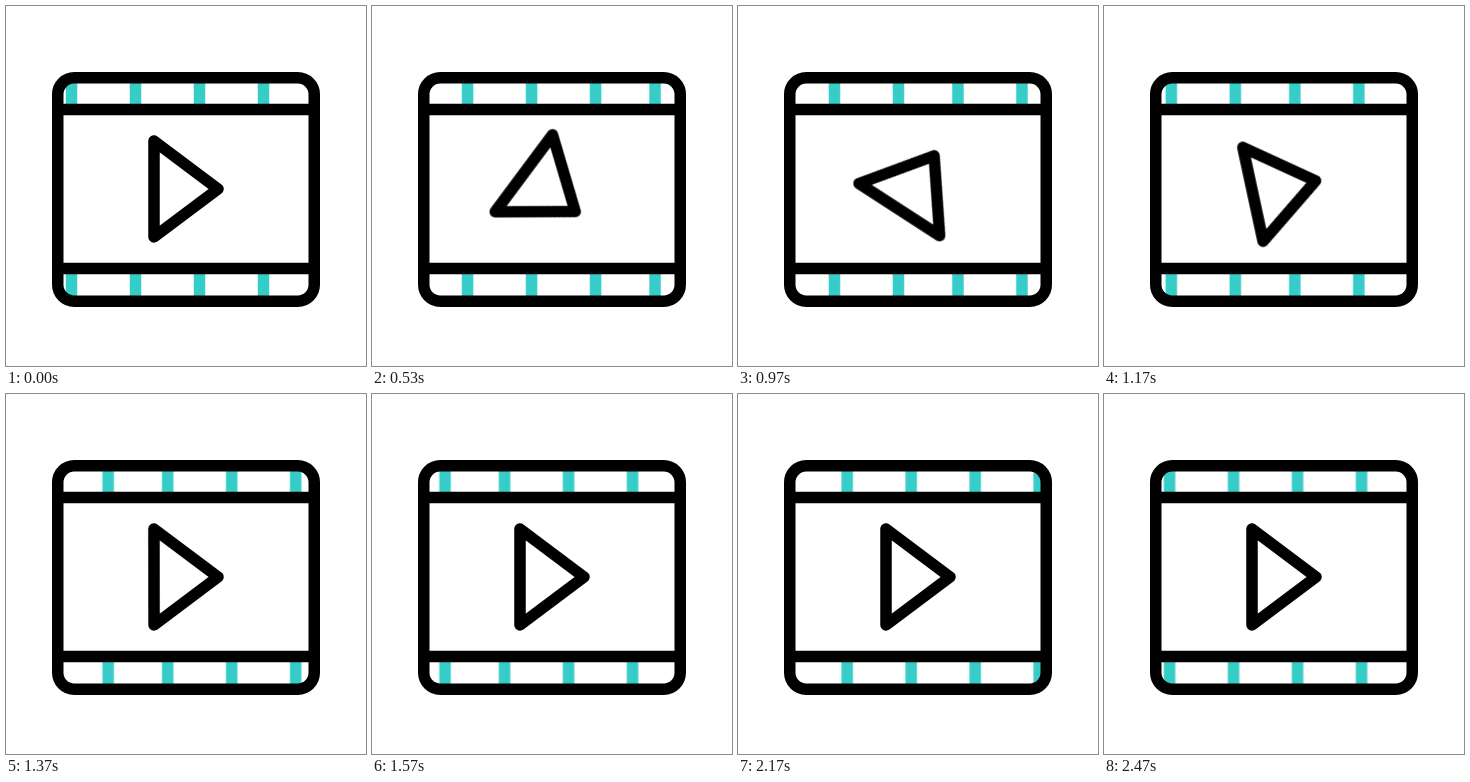
These frames come from a looping animation (360x360 px, 2500 ms). An HTML page:

```html
<!DOCTYPE html>
<html lang="en">
<head>
<meta charset="utf-8">
<title>Film strip player</title>
<style>
  html, body { margin: 0; width: 100%; height: 100%; overflow: hidden; background: #fff; }
  svg { display: block; width: 100vw; height: 100vh; }
  .ink { fill: none; stroke: #000; stroke-width: 11.5; stroke-linecap: round; stroke-linejoin: round; }
  #row { fill: none; stroke: #36cdc8; stroke-width: 25; stroke-dasharray: 11.5 52.5; }

  /* The clock script moves --delay in 30 fps ticks. */
  .strip, .play { animation: 2.5s linear var(--delay, 0s) infinite paused; }
  .strip { animation-name: slide; }
  .play { animation-name: spin; transform-origin: 173.6px 181px; }

  @keyframes slide {
    0%, 12% { transform: translateX(0); }
    98.6667%, 100% { transform: translateX(-315.5px); }
  }
  @keyframes spin {
    0% { transform: rotate(0deg); }
    12% { transform: rotate(0deg); animation-timing-function: cubic-bezier(.468, 0, .308, 1); }
    55.3333%, 100% { transform: rotate(360deg); }
  }
</style>
</head>
<body>
<svg viewBox="0 0 360 360">
  <defs>
    <path id="row" d="M-4.25 87.5h267.5"/>
    <g id="rows">
      <use href="#row"/>
      <use href="#row" y="191"/>
    </g>
    <clipPath id="window"><rect x="54" y="72" width="252" height="223"/></clipPath>
  </defs>
  <g clip-path="url(#window)">
    <g class="strip">
      <use href="#rows"/>
      <use href="#rows" x="315.5"/>
    </g>
  </g>
  <g class="ink">
    <rect x="51.75" y="71.75" width="256.5" height="223.5" rx="16.5"/>
    <path d="M52 103.5H308M52 262.5H308"/>
    <path class="play" d="M148 135V231L212 183Z"/>
  </g>
</svg>
<script>
  const FPS = 30, FRAMES = 75;
  const root = document.documentElement;

  function tick() {
    // Ticks fall on whole 10 ms, just ahead of exact thirtieths.
    const frame = Math.floor((performance.now() + 4) * FPS / 1000) % FRAMES;
    root.style.setProperty('--delay', `${-frame / FPS}s`);
    requestAnimationFrame(tick);
  }
  tick();
</script>
</body>
</html>
```
